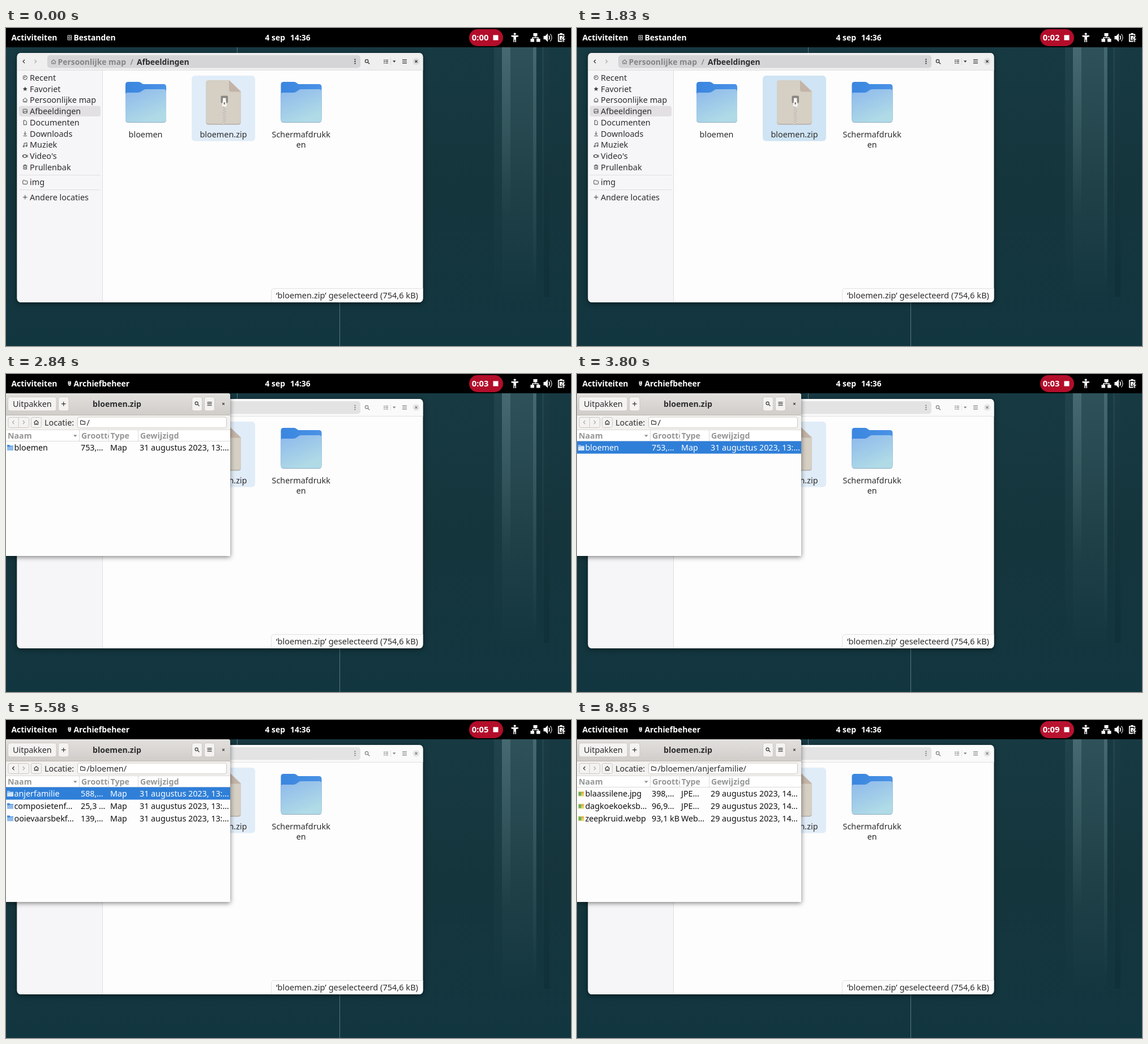
Animation of 998x561 px, one loop 9.41 s. Source, as an HTML page:

```html
<!DOCTYPE html>
<html lang="nl">
<head>
<meta charset="utf-8">
<title>Archiefbeheer</title>
<style>
html, body { margin: 0; width: 100%; height: 100%; overflow: hidden; background: #14363f; }
svg { display: block; }
#stage { width: 100vw; height: 100vh; }
text { font: 14.4px "Noto Sans", "Open Sans", sans-serif; fill: #2d2d2f; }
.b { font-weight: 700; font-size: 13.9px; }
.w { fill: #fff; }
.mid { text-anchor: middle; }
.ln { fill: none; stroke: #333; stroke-width: 1.2; }
.head { fill: #949796; font-size: 14.2px; }
.row text { font-size: 14.3px; fill: #111; }
.row.sel text { fill: #fff; }
.btn { fill: #f4f3f1; stroke: #cdc7c2; }
.shadow { filter: drop-shadow(0 2px 4px rgba(0,0,0,.5)); }

/* one loop = 9410 ms */
.t { animation: 9410ms linear infinite; }
.hard { animation-timing-function: step-end; }
#count { animation-name: count; }
@keyframes count {
  0% { transform: translateY(0); }
  8.927% { transform: translateY(-22px); }
  19.447% { transform: translateY(-44px); }
  30.181% { transform: translateY(-66px); }
  40.701% { transform: translateY(-88px); }
  51.435% { transform: translateY(-110px); }
  62.062% { transform: translateY(-132px); }
  72.689% { transform: translateY(-154px); }
  83.422% { transform: translateY(-176px); }
  94.049%, 100% { transform: translateY(-198px); }
}
#pill { animation-name: pill; }
@keyframes pill { 0%, 91.39% { fill: #b30d2a; } 92.24%, 100% { fill: #b8122f; } }
#appA { animation-name: appA; }
@keyframes appA { 0% { opacity: 1; } 20.723%, 100% { opacity: 0; } }
#appB { animation-name: appB; }
@keyframes appB { 0% { opacity: 0; } 20.723%, 100% { opacity: 1; } }

#pick { animation-name: pick; }
@keyframes pick {
  0%, 2.444% { fill: #e0ecf8; }
  4.57%, 22% { fill: #cfe4f4; }
  24.123%, 100% { fill: #e0ecf8; }
}
#bar { animation-name: bar; }
@keyframes bar { 0%, 22% { fill: #efeff0; } 24.123%, 100% { fill: #fafafa; } }
#tools { animation-name: tools; }
@keyframes tools { 0%, 22% { opacity: 1; } 24.123%, 100% { opacity: .6; } }

#win { animation-name: pop; transform-origin: 198px 177.5px; }
@keyframes pop {
  0% { transform: scale(.01, .05); opacity: 0; }
  20.776% { transform: scale(.01, .05); opacity: 0; animation-timing-function: cubic-bezier(.16, 1, .3, 1); }
  22.37%, 100% { transform: none; opacity: 1; }
}
#top { animation-name: top; }
@keyframes top { 0% { opacity: 1; } 44.102%, 100% { opacity: 0; } }
#topSel { animation-name: topSel; }
@keyframes topSel { 0% { opacity: 0; } 40.383% { opacity: 1; } 44.102%, 100% { opacity: 0; } }
#dir { animation-name: dir; }
@keyframes dir { 0% { opacity: 0; } 44.102% { opacity: 1; } 62.699%, 100% { opacity: 0; } }
#dirSel { animation-name: dirSel; }
@keyframes dirSel { 0% { opacity: 0; } 59.299% { opacity: 1; } 62.699%, 100% { opacity: 0; } }
#leaf { animation-name: leaf; }
@keyframes leaf { 0% { opacity: 0; } 62.699%, 100% { opacity: 1; } }
#back { animation-name: back; }
@keyframes back { 0%, 44.102% { stroke: #a3a5a5; } 45.908%, 100% { stroke: #222; } }
#size { animation-name: size; }
@keyframes size { 0%, 78.853% { fill: #949796; } 79.9%, 80.4% { fill: #626566; } 81.4%, 100% { fill: #949796; } }
#kind { animation-name: kind; }
@keyframes kind { 0%, 80.4% { fill: #949796; } 81.72%, 83.4% { fill: #626566; } 83.422%, 100% { fill: #949796; } }
</style>
</head>
<body>
<svg id="stage" viewBox="0 0 998 561" preserveAspectRatio="none">
<defs>
  <linearGradient id="sky" x2="0" y2="1"><stop stop-color="#173a43"/><stop offset=".5" stop-color="#15353c"/><stop offset="1" stop-color="#123640"/></linearGradient>
  <linearGradient id="beam" x2="0" y2="1"><stop stop-color="#9ac0c4" stop-opacity=".22"/><stop offset="1" stop-color="#9ac0c4" stop-opacity="0"/></linearGradient>
  <linearGradient id="front" x2=".5" y2="1"><stop stop-color="#8db8ec"/><stop offset="1" stop-color="#b0dbe6"/></linearGradient>
  <linearGradient id="tab" x2="1"><stop stop-color="#3a86df"/><stop offset="1" stop-color="#4a92e6"/></linearGradient>
  <linearGradient id="title" x2="0" y2="1"><stop stop-color="#e2e0dd"/><stop offset="1" stop-color="#d0cdc9"/></linearGradient>
  <clipPath id="sizeClip"><path d="M130 99h51.500v19h-51.500z"/></clipPath>
  <symbol id="folder" viewBox="0 0 72 73" overflow="visible">
    <path d="M0 66V5q0-5 5-5h18q3 0 5 2l2 1.500q1 .5 3 .5h34q5 0 5 5v57z" fill="url(#tab)"/>
    <path d="M0 23q0-4 4-4h18q4 0 6-2l3-2q2-2 5-2h31q5 0 5 5v49q0 5-5 5H5q-5 0-5-5z" fill="#8fabc4"/>
    <path d="M0 23q0-4 4-4h18q4 0 6-2l3-2q2-2 5-2h31q5 0 5 5v48q0 5-5 5H5q-5 0-5-5z" fill="url(#front)"/>
  </symbol>
  <symbol id="mini" viewBox="0 0 9 8" overflow="visible"><path d="M.6 1.600q0-1 1-1h2l1 1.200h2.900q1 0 1 1v3.600q0 1-1 1H1.600q-1 0-1-1z"/></symbol>
  <symbol id="house" viewBox="0 0 9 9" overflow="visible"><path d="M.5 4.600L4.500 1l4 3.600M1.500 4v4h6V4M4.500 8V5.600"/></symbol>
  <symbol id="lens" viewBox="0 0 9 9" overflow="visible"><circle cx="3.600" cy="3.600" r="2.700"/><path d="M5.700 5.700l3 3"/></symbol>
  <symbol id="lines" viewBox="0 0 8 8" overflow="visible"><path d="M0 1.200h8M0 4h8M0 6.800h8"/></symbol>
</defs>

<rect width="998" height="561" fill="url(#sky)"/>
<g fill="url(#beam)">
  <path d="M862 34h75v450h-75z" opacity=".35"/><path d="M876 34h60v456h-60z" opacity=".5"/>
  <path d="M876 34h15v300h-15z"/><path d="M931 34h6v420h-6z"/><path d="M947 34h13v400h-13z" opacity=".4"/>
</g>
<path d="M950 34h10v440h-10z" fill="#0c2a33" opacity=".35"/>
<path d="M408.500 34v12M589.500 484v77" stroke="#5c797d" stroke-width="1"/>

<g id="files">
  <rect class="shadow" x="19.500" y="44" width="717" height="440" rx="7" fill="#fdfdfd"/>
  <path d="M19.500 74h151v410h-144q-7 0-7-7z" fill="#f6f5f7"/>
  <path class="t" id="bar" d="M19.500 74V51q0-7 7-7h703q7 0 7 7v23z"/>
  <path d="M170.500 74v410M19.500 74.500h717" stroke="#dfdfe0"/>
  <g class="t" id="tools">
    <rect x="73" y="48" width="553" height="22.500" rx="5" fill="#d5d4d6"/>
    <path class="ln" d="M33 56l-3 3 3 3" stroke-width="1.500"/>
    <path class="ln" d="M50.500 56l3 3-3 3" style="stroke:#aaa"/>
    <use class="ln" href="#house" x="79.500" y="55" width="9" height="9" style="stroke:#777"/>
    <text class="b" x="91.500" y="64.500" style="fill:#858587">Persoonlijke map</text>
    <text x="219.500" y="64.500" style="fill:#777">/</text>
    <text class="b" x="231" y="64.500">Afbeeldingen</text>
    <path d="M615.500 54.500h2v2h-2zm0 3.500h2v2h-2zm0 3.500h2v2h-2zM683 57.500h5.500l-2.750 3.200z" fill="#333"/>
    <use class="ln" href="#lens" x="633.500" y="54.800" width="9" height="9"/>
    <path class="ln" d="M667 56.500h2.500M667 59.200h2.500M667 62h2.500M670.500 56.500h4.500M670.500 59.200h4.500M670.500 62h4.500" stroke-width="1.600"/>
    <path d="M679.500 53v12" stroke="#d5d5d5"/>
    <use class="ln" href="#lines" x="700" y="55" width="8" height="8"/>
    <circle cx="724.500" cy="59" r="6" fill="#dcdcdd"/>
    <path class="ln" d="M722.500 57l4 4M726.500 57l-4 4"/>
  </g>
  <rect x="22.500" y="137.500" width="144.500" height="18.500" rx="4" fill="#e2e0e2"/>
  <path d="M23 259.500h144M23 285.500h144" stroke="#e0dfe1"/>
  <g id="places"></g>
  <g class="ln" stroke-width="1" style="stroke:#444;stroke-width:1">
    <circle cx="33.700" cy="87.500" r="3.600"/><path d="M33.700 85.500v2h-2"/>
    <path d="M33.700 103.500l1.200 2.600 2.800.3-2.100 1.900.6 2.800-2.500-1.500-2.500 1.500.6-2.800-2.100-1.900 2.800-.3z" fill="#444" stroke="none"/>
    <use href="#house" x="29.200" y="122.500" width="9" height="9"/>
    <rect x="30.200" y="143.300" width="7" height="6.800" rx="1"/><path d="M31 149l2-2.500 1.500 1 1.500-1 1 2"/>
    <path d="M31.200 163h3l2 2v5.700h-5z"/>
    <path d="M33.700 182.500v5.500M31.500 186l2.200 2.200 2.200-2.200M30.500 190.300h6.500"/>
    <path d="M32 209v-5.500l5-1v5.500"/><circle cx="31.200" cy="208.800" r="1.200"/><circle cx="36" cy="208" r="1.200"/>
    <path d="M31 223.500h4.500v5H31zM35.500 226l2.500-2v4zM29.500 224v4"/>
    <path d="M30 243h7.500M32.200 243v-1.500h3v1.500M31 243.500v5.500h5.500v-5.500M33 245v2.500M34.700 245v2.500"/>
    <use href="#mini" x="29.200" y="268" width="9" height="8"/>
    <path d="M30 298.500h7.500M33.700 294.700v7.500"/>
  </g>
  <use href="#folder" x="211" y="95" width="72" height="73"/>
  <use href="#folder" x="485.500" y="95" width="72" height="73"/>
  <rect class="t" id="pick" x="328" y="84" width="112" height="115.500" rx="6"/>
  <path d="M353 98q0-5 5-5h36l21 20v52q0 5.500-5 5.500h-52q-5 0-5-5.500z" fill="#b3aca2"/>
  <path d="M353 97q0-5 5-5h36l21 20v52q0 5-5 5h-52q-5 0-5-5z" fill="#d5cfc4"/>
  <path d="M394 92l21 20.500h-17q-4 0-4-4z" fill="#c3b4a7"/>
  <path d="M385.700 138v31" stroke="#f4f2ee" stroke-width="6"/>
  <path d="M384.200 139v30M387.200 140.500v28" stroke="#a39b91" stroke-width="3" stroke-dasharray="1.500 1.500"/>
  <rect x="379.500" y="119.500" width="12.500" height="13" rx="2" fill="#8b8680"/>
  <path d="M383 123.500h5.500v5l1.500 9h-8.500l1.500-9z" fill="#fafaf8"/><path d="M384.500 131h2.500v4h-2.500z" fill="#8b8680"/>
  <text class="mid" x="246.500" y="192.500">bloemen</text>
  <text class="mid" x="384" y="192.500">bloemen.zip</text>
  <text class="mid" x="521.200" y="192.500">Schermafdrukk</text>
  <text class="mid" x="521.200" y="211">en</text>
  <path d="M468.500 484v-19q0-5.500 5.500-5.500h262.500v17.500q0 7-7 7z" fill="#fcfcfc"/>
  <path d="M468.500 484v-19q0-5.500 5.500-5.500h262.500" fill="none" stroke="#e2e2e3"/>
  <text x="477" y="477" style="font-size:14.550px">‘bloemen.zip’ geselecteerd (754,6 kB)</text>
</g>

<g class="t" id="win">
  <path class="shadow" d="M0 34h392q4 0 4 4v283H0z" fill="#fdfdfd"/>
  <path d="M0 34h392q4 0 4 4v34.500H0z" fill="url(#title)"/>
  <path d="M0 72.500h396v26.500H0z" fill="#f3f2f0"/>
  <path d="M0 72.500h396" stroke="#bcb6b0"/>
  <g class="btn">
    <rect x="3.500" y="40.500" width="85.500" height="24.500" rx="3.500"/><rect x="92.500" y="40.500" width="18.500" height="24.500" rx="3.500"/>
    <rect x="328.500" y="40.500" width="18" height="24.500" rx="3.500"/><rect x="350.500" y="40.500" width="18" height="24.500" rx="3.500"/>
    <rect x="4" y="76.500" width="36.500" height="18" rx="3"/><path d="M22.200 76.500v18"/><rect x="44.500" y="76.500" width="18" height="18" rx="3"/>
    <rect x="126.500" y="76" width="263" height="19" rx="3" style="fill:#fff"/>
  </g>
  <text x="12" y="58">Uitpakken</text>
  <text class="b mid" x="196" y="58" style="font-size:14.100px">bloemen.zip</text>
  <path class="ln" d="M98 52.700h7.500M101.700 49v7.500M382.200 50.800l3.600 3.600M385.800 50.800l-3.600 3.600"/>
  <use class="ln" href="#lens" x="333.200" y="48.300" width="8.500" height="8.500" stroke-width="1.400"/>
  <use class="ln" href="#lines" x="355.500" y="48.700" width="8" height="8"/>
  <path class="ln t" id="back" d="M14.500 82.200l-3 3.100 3 3.100"/>
  <path class="ln" d="M29.700 82.200l3 3.100-3 3.100" style="stroke:#a3a5a5"/>
  <use class="ln" href="#house" x="49" y="80.800" width="9" height="9"/>
  <text x="68" y="91">Locatie:</text>
  <use class="ln" href="#mini" x="131" y="81.500" width="9" height="8" stroke-width="1"/>
  <path d="M0 99h396v19H0z" fill="#fff"/>
  <path d="M0 98.500h396M0 118.500h396M129.500 99v19M181.500 99v19M233.500 99v19" stroke="#dcdad7"/>
  <text class="b head" x="3" y="114">Naam</text>
  <path d="M119 107.500h6.500l-3.250 3.500z" fill="#85888a"/>
  <g clip-path="url(#sizeClip)"><text class="b head t" id="size" x="133" y="114">Grootte</text></g>
  <text class="b head t" id="kind" x="184.500" y="114">Type</text>
  <text class="b head" x="237" y="114">Gewijzigd</text>
  <g class="t hard" id="top"></g>
  <g class="t hard" id="topSel"></g>
  <g class="t hard" id="dir"></g>
  <g class="t hard" id="dirSel"></g>
  <g class="t hard" id="leaf"></g>
</g>

<rect width="998" height="34" fill="#000"/>
<text class="b w" x="9.500" y="22">Activiteiten</text>
<g class="t hard" id="appA">
  <path d="M109 13h6.500v8H109zM109 17h6.500M110.800 15h3M110.800 19h3" fill="none" stroke="#ddd"/>
  <text class="b w" x="119.500" y="22">Bestanden</text>
</g>
<g class="t hard" id="appB">
  <path d="M109.500 13h5.500v4.500l-1.500 3.500h-2.500l-1.500-3.500z" fill="#ddd"/><path d="M112.200 14v2M112.200 17.500v2" stroke="#222"/>
  <text class="b w" x="119.500" y="22">Archiefbeheer</text>
</g>
<text class="b w" x="457.500" y="22">4 sep</text>
<text class="b w" x="502" y="22">14:36</text>
<rect class="t" id="pill" x="818" y="2" width="60" height="30" rx="15"/>
<svg x="820" y="6" width="36" height="22" overflow="hidden"><g class="t hard" id="count"></g></svg>
<path d="M860.500 12.500h9v9h-9z" fill="#fff"/>
<g fill="#fff">
  <circle cx="898.700" cy="10.500" r="2.100"/>
  <path d="M892.500 13h12.500v2.200l-4 .8v9h-1.600v-4.500h-1.400V25h-1.600v-9l-3.900-.8z"/>
  <path d="M931.500 9h7v5.500h-7zM926.500 19h6.500v5.500h-6.500zM937 19h6.500v5.500H937zM934.200 14h1.600v2.200h5v3h-1.600v-1.500h-8.400v1.500h-1.600v-3h6z"/>
  <path d="M949.500 14h3l4.500-4.500v15l-4.500-4.500h-3z"/>
  <path d="M958.800 13.500q2.700 3.500 0 7" fill="none" stroke="#fff" stroke-width="1.600"/>
  <path d="M961.500 10.500q5 6.500 0 13" fill="none" stroke="#aaa" stroke-width="1.600"/>
  <path d="M978.500 9h4v2h-4z"/><path d="M975.800 11.300h9.400v12.200h-9.400z" fill="none" stroke="#fff" stroke-width="1.800"/>
  <path d="M978 14h5v7h-5z"/><path d="M985 13.500l-4.500 6h3l-1 5.500 6.500-6.500h-3.500l2-5z" stroke="#000" stroke-width=".8"/>
</g>
</svg>

<script>
const $ = id => document.getElementById(id);
const label = (x, y, s, cls = '') => `<text class="${cls}" x="${x}" y="${y}">${s}</text>`;
const path = s => label(142.5, 91, s);

const folderIcon = (y, sel) =>
  `<path d="M2 ${y - 5}h4l1.500 1.500h5.500v8H2z" fill="${sel ? '#8fbdf0' : '#3f8ae0'}"/>` +
  `<path d="M2 ${y - 1.5}h4.500l1-1h5.500v7.500H2z" fill="${sel ? '#cfe3f6' : '#8fbcec'}"/>`;
const imageIcon = y =>
  `<path d="M2 ${y - 4}h10.500v8.500H2z" fill="#e8d36a"/><path d="M3 ${y - 3}h4.500v6.500H3z" fill="#58b368"/>` +
  `<path d="M7.500 ${y - 3}h4v3h-4z" fill="#f0a04b"/>`;

function row(i, cells, { sel = false, image = false } = {}) {
  const y = 130 + i * 21.8;
  const xs = [14.5, 132, 184, 236];
  return `<g class="row ${sel ? 'sel' : ''}">` +
    (sel ? `<path d="M0 ${y - 11.5}h396v22H0z" fill="#2f7fd8"/>` : '') +
    (image ? imageIcon(y) : folderIcon(y, sel)) +
    cells.map((s, k) => label(xs[k], y + 5, s)).join('') + '</g>';
}

const aug31 = '31 augustus 2023, 13:…', aug29 = '29 augustus 2023, 14…';
const root = ['bloemen', '753,…', 'Map', aug31];
const dirs = [
  ['anjerfamilie', '588,…', 'Map', aug31],
  ['composietenf…', '25,3 …', 'Map', aug31],
  ['ooievaarsbekf…', '139,…', 'Map', aug31]
];
const pics = [
  ['blaassilene.jpg', '398,…', 'JPE…', aug29],
  ['dagkoekoeksb…', '96,9…', 'JPE…', aug29],
  ['zeepkruid.webp', '93,1 kB', 'Web…', aug29]
];
$('top').innerHTML = path('/') + row(0, root);
$('topSel').innerHTML = row(0, root, { sel: true });
$('dir').innerHTML = path('/bloemen/') + dirs.map((d, i) => row(i, d)).join('');
$('dirSel').innerHTML = row(0, dirs[0], { sel: true });
$('leaf').innerHTML = path('/bloemen/anjerfamilie/') + pics.map((p, i) => row(i, p, { image: true })).join('');

const places = ['Recent', 'Favoriet', 'Persoonlijke map', 'Afbeeldingen', 'Documenten', 'Downloads', 'Muziek', "Video's", 'Prullenbak'];
$('places').innerHTML = places.map((s, i) => label(42, 92.8 + i * 19.74, s)).join('') +
  label(42, 277.3, 'img') + label(42, 303.7, 'Andere locaties');

$('count').innerHTML = Array.from({ length: 10 }, (_, i) =>
  `<text class="b w" style="font-size:14.8px" x="2.800" y="${16 + 22 * i}">0:0${i}</text>`).join('');
</script>
</body>
</html>
```
